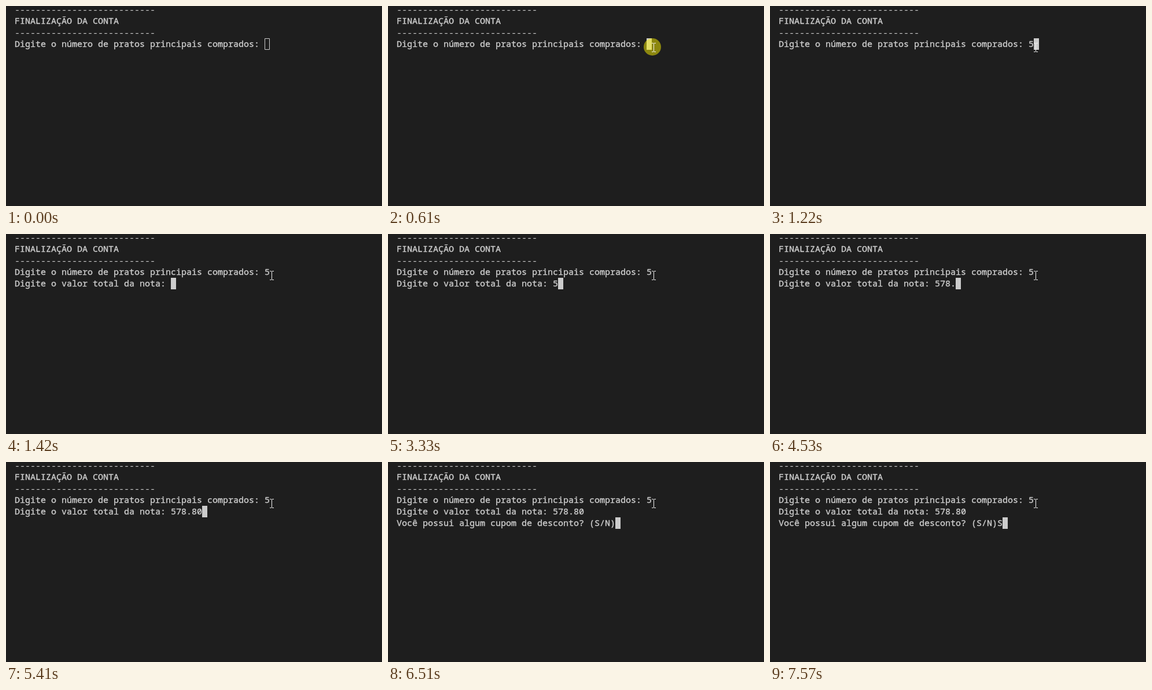
Write an HTML page with a canvas that moves like this. It is 650 px wide and 347 px high and loops after 8000 ms.

```html
<!DOCTYPE html>
<html lang="pt">
<head>
<meta charset="utf-8">
<title>Terminal</title>
<style>
  html, body { margin: 0; width: 100%; height: 100%; overflow: hidden; background: #1e1e1e; }
  canvas { display: block; width: 650px; height: 347px; }
</style>
</head>
<body>
<canvas id="stage" width="650" height="347"></canvas>
<script>
const ctx = document.getElementById('stage').getContext('2d');
const LOOP = 8000, LEFT = 15, TOP = -4, CELL = 9, ROW = 20;
const BG = '#1e1e1e', FG = '#cccccc';
const RULE = '-'.repeat(27);
const FOCUS = 610, RELEASE = 680;

// [time, text appended to the terminal]
const output = [
  [0, RULE + '\nFINALIZAÇÃO DA CONTA\n' + RULE + '\nDigite o número de pratos principais comprados: '],
  [1220, '5'],
  [1420, '\nDigite o valor total da nota: '],
  [3330, '5'], [3590, '7'], [3790, '8'], [4530, '.'], [5140, '8'], [5410, '0'],
  [6450, '\n'],
  [6510, 'Você possui algum cupom de desconto? (S/N)'],
  [7570, 'S']
];

// [time, x, y] of the pointer
const path = [
  [70, 529, 13], [138, 523, 92], [206, 507, 157], [274, 488, 183], [342, 474, 164],
  [410, 465, 128], [478, 461, 98], [546, 459, 79], [610, 459, 72]
];

function rect(color, x, y, w, h) {
  ctx.fillStyle = color;
  ctx.fillRect(x, y, w, h);
}

function drawText(lines) {
  ctx.font = '15px "Noto Sans Mono", "DejaVu Sans Mono", monospace';
  ctx.textBaseline = 'alphabetic';
  ctx.fillStyle = ctx.strokeStyle = FG;
  ctx.lineWidth = 0.4;
  ctx.lineJoin = 'round';
  lines.forEach((line, i) => {
    const y = TOP + i * ROW;
    if (line === RULE) {
      ctx.fillText(line, LEFT, y + 16);
    } else {
      // a hairline outline gives the letters their heavier weight
      ctx.fillText(line, LEFT, y + 15);
      ctx.strokeText(line, LEFT, y + 15);
    }
  });
}

function drawCaret(lines, focused) {
  const row = lines.length - 1;
  const x = LEFT + lines[row].length * CELL, y = TOP + row * ROW;
  if (focused) {
    rect(FG, x, y, CELL, ROW);
  } else {
    ctx.strokeStyle = FG;
    ctx.lineWidth = 1;
    ctx.strokeRect(x + 0.5, y + 0.5, CELL - 1, ROW - 1);
  }
}

function drawPointer(t) {
  const at = path.filter(p => p[0] <= t).pop();
  if (!at) return;
  const [, x, y] = at;
  if (t >= FOCUS && t < RELEASE) {
    ctx.fillStyle = 'rgba(250, 240, 0, 0.5)';
    ctx.beginPath();
    ctx.arc(x - 2, y - 1, 15, 0, Math.PI * 2);
    ctx.fill();
  }
  const white = '#f4f4f4';
  rect(white, x, y - 7, 1, 14);
  for (const end of [y - 8, y + 7]) {
    rect(white, x - 3, end, 3, 1);
    rect(white, x + 1, end, 3, 1);
  }
}

function draw(t) {
  const lines = output.filter(o => o[0] <= t).map(o => o[1]).join('').split('\n');
  rect(BG, 0, 0, 650, 347);
  drawText(lines);
  drawCaret(lines, t >= FOCUS);
  drawPointer(t);
}

const start = performance.now();
function tick() {
  draw((performance.now() - start) % LOOP);
  requestAnimationFrame(tick);
}
tick();
</script>
</body>
</html>
```
